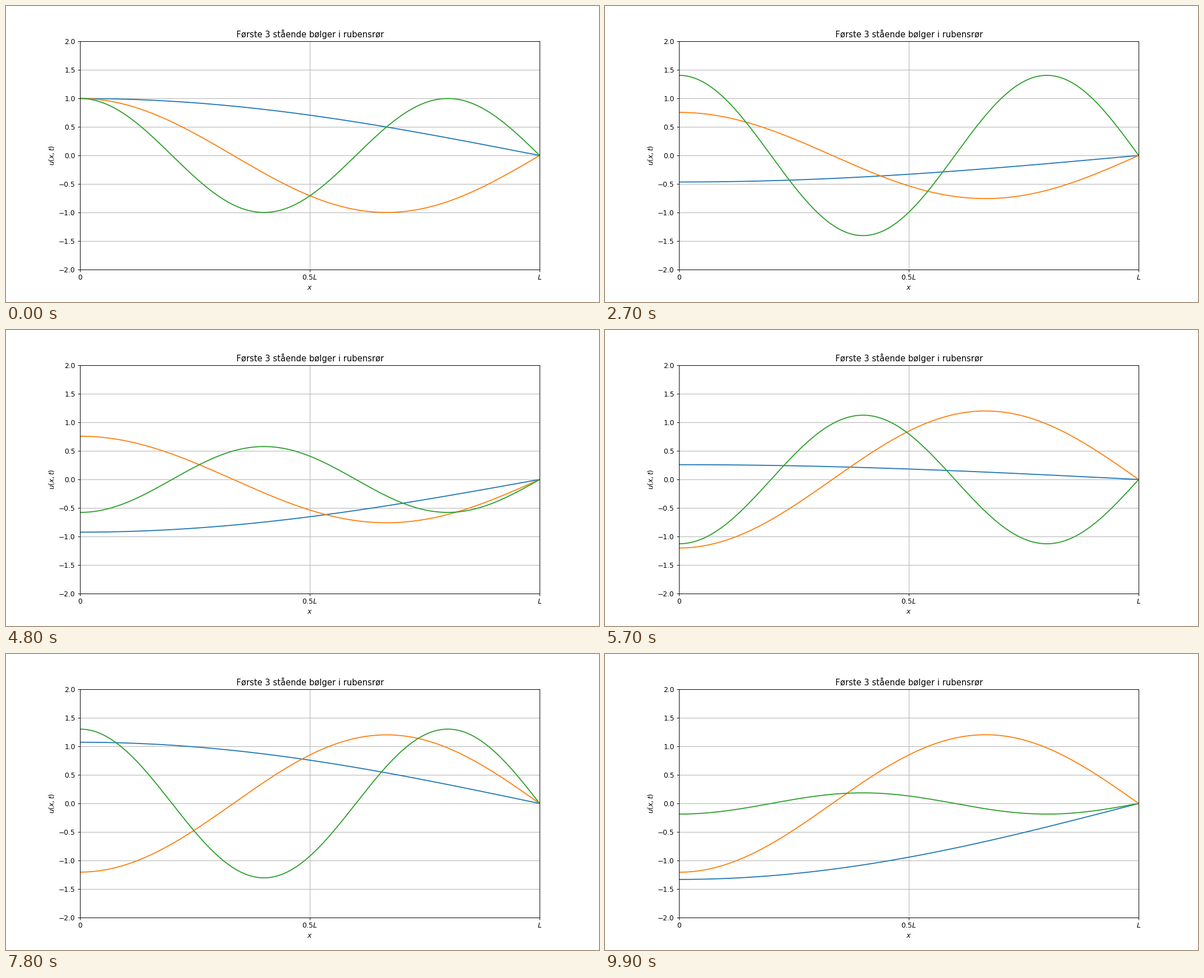
Animation, 1058 px wide and 529 px high, one loop 10 s. Source, as a matplotlib script:

```python
import numpy as np
import matplotlib.pyplot as plt
from matplotlib.animation import FuncAnimation

FRAMES = 100
LENGTH = 1.0
SPEED = 1.0

plt.rcParams["font.family"] = "DejaVu Sans"

x = np.linspace(0, LENGTH, 400)
times = np.linspace(0, 2 * np.pi, FRAMES)


def wave(n, t):
    """Standing wave number n in a tube closed at one end."""
    k = (2 * n - 1) * np.pi / (2 * LENGTH)
    w = k * SPEED
    return (np.cos(w * t) + np.sin(w * t)) * np.cos(k * x)


fig, ax = plt.subplots(figsize=(12, 6), dpi=88.16667)
ax.set_title("Første 3 stående bølger i rubensrør")
ax.set_xlabel("$x$")
ax.set_ylabel("$u(x,t)$")
ax.set_xlim(0, LENGTH)
ax.set_ylim(-2, 2)
ax.set_xticks([0, LENGTH / 2, LENGTH], ["0", "$0.5L$", "$L$"])
ax.grid(True)

modes = (1, 2, 3)
lines = [ax.plot(x, wave(n, 0))[0] for n in modes]


def update(i):
    for n, line in zip(modes, lines):
        line.set_ydata(wave(n, times[i]))
    return lines


anim = FuncAnimation(fig, update, frames=FRAMES, interval=100,
                     repeat=True, repeat_delay=0, blit=False)
plt.show()
```
